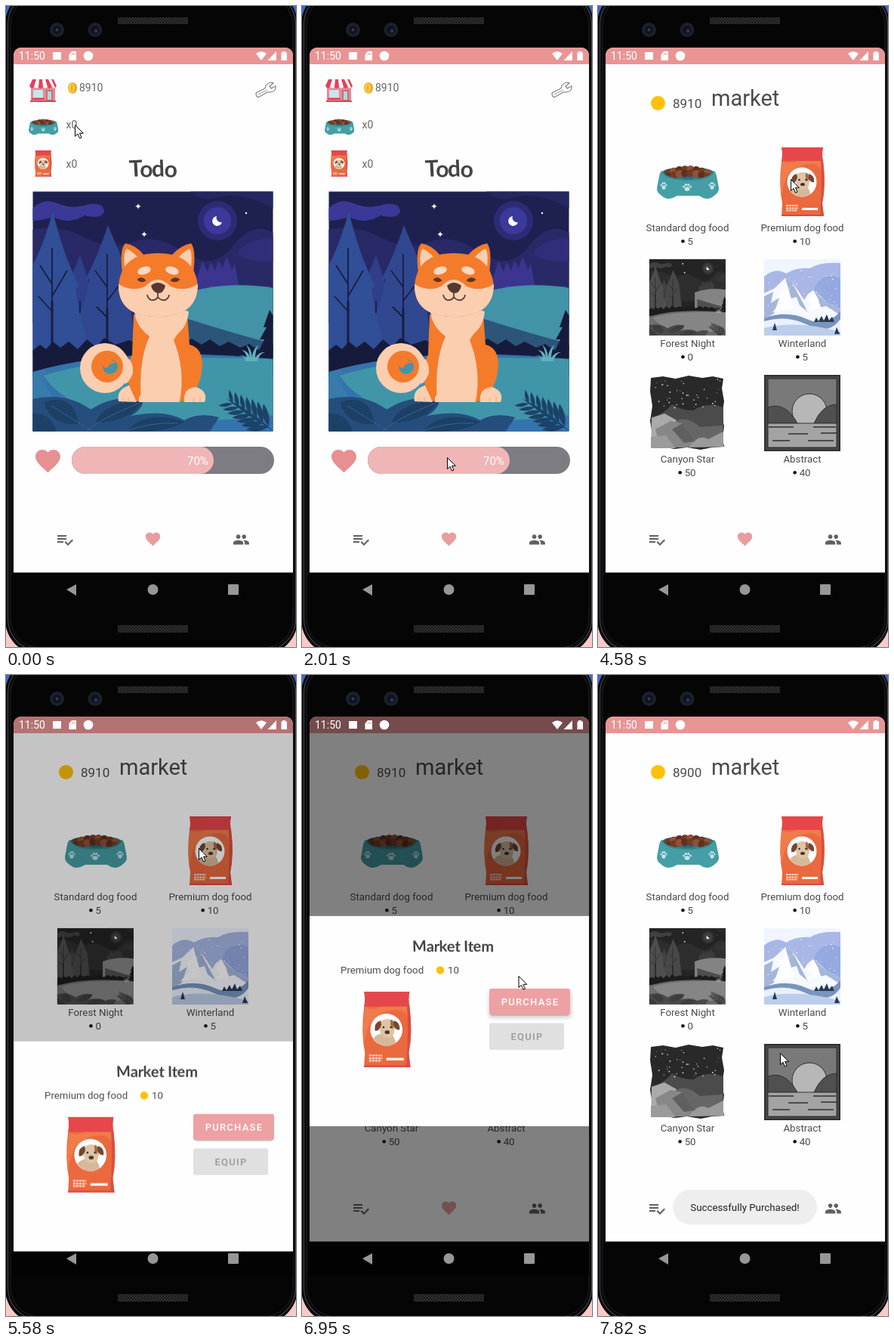
Write an HTML page that moves like this. It is 384 px wide and 848 px high and loops after 8000 ms.

```html
<!DOCTYPE html>
<html lang="en">
<head>
<meta charset="utf-8">
<title>Pet market</title>
<style>
html, body { margin: 0; width: 100%; height: 100%; overflow: hidden; background: #000; }
svg { display: block; }
#stage { width: 384px; height: 848px; font-family: Roboto, sans-serif; }
.title { font-family: Lato, sans-serif; font-weight: 700; fill: #444; text-anchor: middle; }
.mid { text-anchor: middle; }
.btn { font-size: 13px; font-weight: 500; letter-spacing: 1.25px; text-anchor: middle; }
.grey { filter: grayscale(1); }
</style>
</head>
<body>
<svg id="stage" viewBox="0 0 384 848">
<defs>
  <clipPath id="screen"><path d="M10 795V67Q10 55 22 55H368Q380 55 380 67V795Z"/></clipPath>
  <clipPath id="sceneBox"><path d="M35.5 245.5H353.5V562.7H35.5Z"/></clipPath>
  <clipPath id="pic"><path d="M0 0H101V101H0Z"/></clipPath>
  <pattern id="mesh" width="4" height="4" patternUnits="userSpaceOnUse">
    <path d="M0 0H4V4H0Z" fill="#1b1b1b"/><path d="M0 4L4 0M0 0L4 4" stroke="#333" stroke-width=".8"/>
  </pattern>
  <path id="heart" d="M12 21.35l-1.45-1.32C5.4 15.36 2 12.28 2 8.5 2 5.42 4.42 3 7.5 3c1.74 0 3.41.81 4.5 2.09C13.09 3.81 14.76 3 16.5 3 19.58 3 22 5.42 22 8.5c0 3.78-3.4 6.86-8.55 11.54z"/>
  <path id="star" d="M0-4Q.5-.5 4 0 .5.5 0 4-.5.5-4 0-.5-.5 0-4Z" fill="#fff"/>
  <g id="paw" fill="#c4e6e7"><ellipse cy="2" rx="3.4" ry="2.8"/><circle cx="-4.5" cy="-1" r="1.5"/><circle cx="-1.7" cy="-3.4" r="1.6"/><circle cx="1.7" cy="-3.4" r="1.6"/><circle cx="4.5" cy="-1" r="1.5"/></g>

  <g id="bowl">
    <ellipse cx="41" cy="10" rx="35" ry="8" fill="#27717d"/>
    <g id="kibble"></g>
    <path d="M7 7Q12 18 41 18T75 7Q78 8 79 14L82 30Q82 36 77 39 72 44 66 44 60 43 56 40H27Q22 43 16 44 10 44 5 39 0 36 0 30L3 14Q4 8 7 7Z" fill="#459ea6"/>
    <path d="M7 8Q12 19 41 19T75 8" fill="none" stroke="#2f828c" stroke-width="1.6"/>
    <use href="#paw" x="40" y="29"/><use href="#paw" transform="translate(9 27)scale(.75 1)"/><use href="#paw" transform="translate(73 27)scale(.75 1)"/>
  </g>

  <g id="bag">
    <path d="M2 0H57Q55 10 57 18 61 50 56 74L58 91H2L3 74Q-2 50 2 18 4 10 2 0Z" fill="#ea693f"/>
    <path d="M2 0H57Q55 9 57 18H2Q4 9 2 0Z" fill="#e6474a"/>
    <path d="M3 18Q10 23 24 18H57L58 40Q53 14 24 26 5 34 2 66-1 42 3 18Z" fill="#f07b4b"/>
    <path d="M57 18Q61 50 56 74L58 91H53Q56 50 54 18Z" fill="#db4d40"/>
    <path d="M2 89H58V91H2Z" fill="#d94842"/>
    <circle cx="29" cy="46" r="19.5" fill="#fff"/>
    <path d="M13 57Q18 50 24 51H35Q40 57 40 62 29 70 17 61Z" fill="#d5b99a"/>
    <path d="M20 40Q22 33 30 33T40 40L38 51Q36 56 30 56T22 51Z" fill="#dfc4a4"/>
    <path d="M22 35Q14 37 15 47 20 49 23 40ZM38 35Q46 37 45 46 40 47 37 40Z" fill="#744733"/>
    <path d="M36 34Q39 38 37 45 33 43 34 34Z" fill="#a36a49"/>
    <circle cx="25.5" cy="43" r="1.3" fill="#332"/><circle cx="34.5" cy="43" r="1.3" fill="#332"/><ellipse cx="30" cy="49" rx="3" ry="2.1" fill="#49332b"/>
    <path d="M8 77H24M8 80.5H24M8 83.5H23" stroke="#fbd5c5" stroke-width="2" stroke-dasharray="3 .7"/>
    <path d="M29 81.5H50" stroke="#fff" stroke-width="3"/>
  </g>

  <g id="scene" clip-path="url(#sceneBox)">
    <path d="M35 245H354V563H35Z" fill="#1e2150"/>
    <path d="M35 296Q70 288 104 306T168 312 236 326 300 318 354 300V420H35Z" fill="#292968"/>
    <path d="M35 268Q50 253 68 261 88 270 110 262 130 260 130 272 126 283 104 277 84 290 62 279 48 284 35 284Z" fill="#3b3997"/>
    <path d="M250 250Q262 259 286 252T354 268V245H244Z" fill="#252761"/>
    <path d="M306 328Q316 309 354 306V338Q322 340 306 328Z" fill="#302e78"/>
    <circle cx="280" cy="284" r="26" fill="#2c2c76"/><circle cx="280" cy="284" r="18" fill="#3b3999"/>
    <path d="M279 278A6.5 6.5 0 1 0 286 286 6 6 0 0 1 279 278Z" fill="#fff"/>
    <use href="#star" x="175" y="265"/><use href="#star" x="183" y="302"/><circle cx="318" cy="274" r="1.2" fill="#fff"/>
    <path d="M240 375L248 348 253 360 260 337 267 352 271 338 277 350 281 337 287 347 292 331 299 349 303 341 309 375Z" fill="#3b3590"/>
    <path d="M225 384Q285 362 354 373V470H225Z" fill="#4292a8"/>
    <path d="M235 412Q290 430 354 447V465H235Z" fill="#2c5579"/>
    <path d="M98 330Q84 366 66 402V455H140Z" fill="#303f8a"/>
    <path d="M135 290Q122 330 105 362L111 361Q106 390 96 410V460H172L160 350Z" fill="#304890"/>
    <path d="M62 272Q50 315 35 344V460H113Q96 410 92 372L97 371Q76 330 62 272Z" fill="#304f97"/>
    <g fill="none" stroke="#191d44" stroke-width="1.8">
      <path d="M61 320V460M61 368L45 343M61 384L81 350M61 404L43 384M134 328V460M134 372L118 350M134 390L151 368M134 412L120 398M98 390V406"/>
      <path d="M61 390V460M134 400V460" stroke-width="3"/>
    </g>
    <path d="M35 456L45 448 53 454 62 444 72 452 83 444 95 454 107 441 119 451 130 439 145 448 163 442 180 450 210 441 230 450 246 440 259 448 270 441 283 450 295 444 310 452 322 447 333 455 354 452V490H35Z" fill="#171b3b"/>
    <path d="M35 484Q160 448 354 467V563H35Z" fill="#3573ad"/>
    <path d="M50 489Q140 459 354 467V541Q240 556 154 543 75 529 50 489Z" fill="#4195a8"/>
    <path d="M35 485Q60 478 50 489 55 525 90 530L35 544Z" fill="#367bab"/>
    <path d="M349 402L341 425H345L336 441H342L335 456H354V410Z" fill="#171b3b"/>
    <path d="M312 455Q321 456 323 465 322 455 318 448 325 453 326 465 326 454 335 448 330 455 330 466 335 457 343 458 335 460 333 470H317Q317 462 308 463 315 461 319 466 318 458 312 455Z" fill="#5eb3bd"/>
    <path d="M35 520Q80 510 112 534 145 512 182 522 178 543 146 547 205 530 236 548 255 537 282 544L270 563H35Z" fill="#254e7c"/>
    <path d="M50 524Q89 511 96 552 62 558 50 524ZM118 552Q130 523 181 521 170 548 118 552ZM160 563Q185 533 236 550 210 566 160 563ZM35 539Q60 538 67 563H35Z" fill="#1d4066"/>
    <path d="M60 529L115 563M177 525Q123 547 106 563M228 552Q190 550 158 563" fill="none" stroke="#376292"/>
    <g id="fern" fill="#1c4268"></g>
  </g>

  <g id="dog">
    <circle cx="131" cy="479" r="33" fill="#fbceb0"/><circle cx="134" cy="477" r="21" fill="#f47b2a"/>
    <circle cx="138" cy="477" r="10" fill="#4195a8"/><path d="M128 475Q130 467 138 467L147 472Q137 471 135 478 130 480 128 475Z" fill="#f47b2a"/>
    <path d="M169 408Q201 426 240 408L243 448Q260 452 260 475 258 501 248 510L262 523H160Q157 510 163 500 155 485 167 461Z" fill="#f47b2a"/>
    <path d="M170 404Q198 393 242 404 240 424 227 434L222 442Q238 482 230 523H179Q175 470 190 437 172 424 170 404Z" fill="#fbceb0"/>
    <path d="M160 465Q169 470 168 486 163 498 158 500 150 488 160 465Z" fill="#fbceb0"/>
    <path d="M149 523Q146 507 163 502L173 524ZM176 524Q174 511 191 511 204 511 204 524ZM202 524Q205 511 219 511 231 512 230 524ZM236 524Q234 505 252 504 268 510 263 524Z" fill="#fbceb0"/>
    <path d="M155 518V524M162 517V524M249 518V524M257 517V524" fill="none" stroke="#eeae8a" stroke-width="1.2"/>
    <path d="M154 353Q150 322 158 314 172 316 183 330ZM248 353Q252 322 245 314 232 316 219 330Z" fill="#f47b2a"/>
    <path d="M157 345Q155 326 160 321 168 325 175 333ZM245 345Q247 326 243 321 235 325 228 333Z" fill="#fbceb0"/>
    <path d="M149 371Q152 327 201 327T254 371Q252 411 201 411T149 371Z" fill="#f47b2a"/>
    <path d="M149 368Q168 379 184 371 193 362 201 362T218 371Q236 379 254 368 254 411 201 411T149 368Z" fill="#fbceb0"/>
    <ellipse cx="183" cy="350" rx="9" ry="5" fill="#fbd9c4" transform="rotate(-16 183 350)"/><ellipse cx="220" cy="350" rx="9" ry="5" fill="#fbd9c4" transform="rotate(16 220 350)"/>
    <path d="M174 362Q179 357 185 363 180 367 174 362ZM218 363Q224 357 230 362 224 367 218 363Z" fill="#59372c" stroke="#59372c"/>
    <path d="M192 370Q201 362 211 370 209 380 201 380 194 378 192 370Z" fill="#56392f"/>
    <path d="M201 379V385Q198 390 192 389 188 387 187 382M201 385Q205 390 211 389 216 386 216 382" fill="none" stroke="#56392f" stroke-width="1.7"/>
  </g>

  <g id="winter" clip-path="url(#pic)">
    <path d="M0 0H101V101H0Z" fill="#a8b7e6"/>
    <circle cx="89" cy="45" r="23" fill="#94a9df"/>
    <path d="M0 0H101V5Q74 3 61 12 43 10 29 19 15 10 0 23Z" fill="#f0f5ff"/>
    <path d="M0 45L13 39 28 25 37 30 46 43 53 54 58 46 65 41 75 49 83 57 101 66V101H0Z" fill="#f6f9ff"/>
    <path d="M28 25L37 30 44 44 58 70 47 61 43 50 36 52ZM65 41L83 57 101 66V74L82 62 74 64 72 53ZM0 49L12 43 9 58 20 51 13 72 0 80Z" fill="#a4b6da"/>
    <path d="M28 25L27 41 20 43 23 57 11 70 40 64 33 47ZM65 41L58 55 64 61 54 68 76 65Z" fill="#fff"/>
    <path d="M0 78Q30 67 56 79T101 69V101H0Z" fill="#7994bd"/>
    <path d="M0 82Q30 73 58 87T101 79V101H0Z" fill="#e9f0fc"/>
    <path d="M0 91Q42 80 101 96V101H0Z" fill="#bbcdea"/>
    <path d="M66 83L69 77 72 82 76 75 79 81 83 73 86 81 90 76 93 83ZM11 94L14 84 17 94ZM93 99L96 90 100 99Z" fill="#263a56"/>
    <g id="snow" fill="#e9f0ff"></g>
  </g>

  <g id="canyon">
    <path d="M2 4L18 2 35 5 52 1 70 4 84 2 98 5 96 18 99 35 96 54 99 68 97 84 99 95 83 96 68 99 50 96 33 98 18 95 2 97 4 79 1 61 4 41 1 22Z" fill="#292929"/>
    <path d="M3 55Q16 55 30 39 42 47 58 47 78 35 98 43V85L4 86Z" fill="#4b4b4b"/>
    <path d="M28 67Q45 49 67 69L97 67V95L50 96Z" fill="#666"/>
    <path d="M3 57L20 51 36 60 30 72 51 95 2 97Z" fill="#aaa"/>
    <path d="M8 72L28 61 44 64 61 88 50 96 15 96Z" fill="#878787"/>
    <path d="M2 82L22 80 35 97 2 97ZM52 96Q65 77 78 85L98 75V95Z" fill="#9b9b9b"/>
    <path d="M30 72L44 64 61 88 46 90Z" fill="#606060"/>
    <g id="night" fill="#eee"></g>
  </g>

  <g id="abstract" stroke="#303030">
    <path d="M1 1H100V100H1Z" fill="#484848" stroke-width="2"/><path d="M5 5H96V96H5Z" fill="#797979"/>
    <circle cx="60" cy="48" r="23" fill="#b7b7b7"/>
    <path d="M5 43Q28 35 44 64H5ZM96 39Q77 39 66 64H96Z" fill="#505050"/>
    <path d="M5 64H96V96H5Z" fill="#a3a3a3"/>
    <path d="M6 69H39M65 69H95M32 78H58M11 87H34M58 87H92M75 77H96" stroke-width="1.5"/>
  </g>
</defs>

<path d="M0 0H384V700H0Z" fill="#3c69cf"/><path d="M0 728H384V848H0Z" fill="#fac9c8"/>
<rect x="-1" y="-22" width="387" height="880" rx="46" fill="#08080a"/>
<rect x="2.5" y="-18" width="381" height="871" rx="42" fill="none" stroke="#454548" stroke-width="1.2"/>
<rect x="6" y="-14" width="374" height="863" rx="39" fill="#050506" stroke="#222225"/>
<path d="M148 15H241V24H148ZM148 819H241V829H148Z" fill="url(#mesh)"/>
<g fill="#1c202a"><circle cx="67.5" cy="31.5" r="9.5"/><circle cx="118" cy="31.5" r="9.5"/></g>
<g fill="#10131e"><circle cx="67.5" cy="31.5" r="5.5"/><circle cx="118" cy="31.5" r="5.5"/></g>
<g fill="#2d3a5a"><circle cx="67.5" cy="31.5" r="2"/><circle cx="119" cy="33" r="2.2"/></g>

<g clip-path="url(#screen)">
  <path d="M10 55H380V750H10Z" fill="#fefefe"/>
  <path d="M10 55H380V77H10Z" fill="#e89594"/>
  <path d="M10 749.5H380V795H10Z" fill="#050505"/>

  <g id="home" fill="#666" font-size="14">
    <g transform="translate(31 97)">
      <path d="M2 10H34V30H2Z" fill="#ee8597"/><path d="M5 14H18V24H5Z" fill="#c2e7ed"/><path d="M22 14H31V29H22Z" fill="#c67268"/><path d="M24 16H29V27H24Z" fill="#a6dbe4"/>
      <path d="M3 25H20V27H3ZM1 28H35V30H1Z" fill="#d94258"/>
      <path d="M4 0H32L36 9Q33 14 30 10 27 14 24 10 21 14 18 10 15 14 12 10 9 14 6 10 3 14 0 9Z" fill="#e6405c"/>
      <path d="M9 0H13L12 10Q9 14 6 10ZM17 0H21L24 10Q21 14 18 10ZM25 0H29L34 11Q32 13 30 10Z" fill="#fff"/>
    </g>
    <ellipse cx="88" cy="108.5" rx="6" ry="7.3" fill="#e4a31f"/><ellipse cx="87" cy="108.5" rx="4.5" ry="6.2" fill="#f6c944"/><path d="M87 105V112" stroke="#e0a52a" stroke-width="1.5"/>
    <text x="97" y="113">8910</text><text x="79.5" y="161.5">x0</text><text x="79.5" y="213.5">x0</text>
    <use href="#bowl" transform="translate(30 149.5)scale(.48)"/><use href="#bag" transform="translate(38 191)scale(.38)"/>
    <path d="M331 115L343 109Q344 102 351 101L354 102 349 106 351 109 357 106Q358 113 350 114L346 114 334 121Q331 120 331 115Z" fill="#fff" stroke="#777" stroke-width="1.1"/><path d="M334 117L346 111" stroke="#999"/>
    <text class="title" x="194.5" y="226" font-size="30" letter-spacing="-1" rotate="-3 2 -2 3">Todo</text>
    <use href="#scene"/><use href="#dog"/>
    <use href="#heart" transform="translate(35.7 582)scale(1.65)" fill="#e69091"/>
    <rect x="87" y="583" width="268" height="36" rx="18" fill="#7d7c82"/><rect x="87" y="583" width="188" height="36" rx="18" fill="#f0b5b6"/>
    <text x="240" y="607" font-size="15" fill="#fff">70%</text>
  </g>

  <g id="market" fill="#4b4b4b">
    <circle cx="79.5" cy="128.5" r="9.5" fill="#ffc107"/>
    <text id="before" x="99" y="135" font-size="17">8910</text><text id="after" x="99" y="135" font-size="17">8900</text>
    <text x="150" y="132" font-size="29">market</text>
    <use href="#bowl" x="78" y="211"/><use href="#bag" x="241" y="187"/>
    <g class="grey"><use href="#scene" transform="translate(68 335)scale(.318)translate(-36 -246)"/></g>
    <use href="#winter" x="220" y="335"/><use href="#canyon" x="68" y="488"/><use href="#abstract" x="220" y="488"/>
    <g id="labels" font-size="13.3"></g>
  </g>

  <g fill="#616161">
    <path transform="translate(66 694)" d="M14 10H2v2h12v-2zm0-4H2v2h12V6zM2 16h8v-2H2v2zm19.5-4.5L23 13l-6.99 7-4.51-4.5L13 14l3.01 3z"/>
    <use href="#heart" transform="translate(182.9 693.5)scale(.97)" fill="#e89e9f"/>
    <path transform="translate(300 694.5)scale(.95)" d="M16 11c1.66 0 3-1.34 3-3s-1.34-3-3-3-3 1.34-3 3 1.34 3 3 3zm-8 0c1.66 0 3-1.34 3-3S9.66 5 8 5 5 6.34 5 8s1.34 3 3 3zm0 2c-2.33 0-7 1.17-7 3.5V19h14v-2.5c0-2.33-4.67-3.5-7-3.5zm8 0l-1 .05c1.2.84 2 1.97 2 3.45V19h6v-2.5c0-2.33-4.67-3.5-7-3.5z"/>
  </g>

  <path id="dim" d="M10 55H380V795H10Z"/>
  <g id="sheet" fill="#4b4b4b">
    <path d="M10 0H380V278H10Z" fill="#fefefe"/>
    <text class="title" x="200" y="47" font-size="20" letter-spacing="-.2" rotate="-2 1 2 -1 1 2 0 -1 2 -2 1">Market Item</text>
    <text x="51" y="75.5" font-size="13.3">Premium dog food</text><circle cx="183" cy="71.5" r="5.2" fill="#ffc107"/><text x="193" y="75.5" font-size="13.3">10</text>
    <use href="#bag" transform="translate(80 100)scale(1.095)"/>
    <rect x="249" y="98" width="105" height="34" rx="4" fill="#ccc"/>
    <rect id="lift" x="247" y="99" width="110" height="36" rx="5" fill="#999" style="filter:blur(2px)"/>
    <rect x="248" y="96" width="107" height="34.5" rx="3" fill="#eda1a2"/><text class="btn" x="302" y="118" fill="#fff">PURCHASE</text>
    <rect x="248" y="141.5" width="99" height="35.5" rx="3" fill="#e0e0e0"/><text class="btn" x="298" y="164" fill="#999">EQUIP</text>
  </g>
  <g id="toast"><rect x="99" y="681" width="191" height="46" rx="23" fill="#eee"/><text class="mid" x="194.5" y="709" font-size="13.3" fill="#222">Successfully Purchased!</text></g>
</g>

<g fill="#fff">
  <text x="17" y="71" font-size="14">11:50</text>
  <path d="M62 61H73V71H62ZM87 60H93V72H83.5V64Z"/><path d="M86 63V65M88.5 62V65M91 62V65" stroke="#e89594"/>
  <circle cx="109" cy="66" r="6.3"/>
  <path d="M331 63Q338 57.5 345 63L338 72ZM358 60V72H346.5ZM366 60H370V61.5H372V72H364.5V61.5H366Z"/>
</g>
<g fill="#979797"><path d="M80 772L93 765V780Z"/><circle cx="194.5" cy="772" r="7"/><rect x="294" y="765" width="14" height="14" rx="1"/></g>
<path id="cursor" d="M.5 .5V15.5L4 12.2 6.5 18 9 17 6.5 11.3H11.3Z" fill="#fff" stroke="#000"/>
</svg>

<script>
const $ = id => document.getElementById(id);
const LOOP = 8000;
const IN = 'cubic-bezier(.333,0,.667,.333)', OUT = 'cubic-bezier(.333,.667,.667,1)';

// Small repeated shapes
let seed = 7;
const rnd = n => (seed = seed * 16807 % 2147483647) / 2147483647 * n;
const dots = (id, n, w, h, r, x = 0, y = 0) => {
  for (let i = 0; i < n; i++)
    $(id).innerHTML += `<circle cx="${x + rnd(w)}" cy="${y + rnd(h)}" r="${r * (.5 + rnd(.6))}"/>`;
};
dots('snow', 55, 101, 60, .8, 0, 15);
dots('night', 42, 88, 39, .8, 6, 5);
for (let i = 0; i < 16; i++) {
  const x = 15 + i % 8 * 7.4, y = 10 + (i >> 3) * 5 - Math.sin((x - 15) / 16.5) * 5;
  $('kibble').innerHTML += `<circle cx="${x}" cy="${y}" r="5" fill="${['#713c26', '#925137', '#5d3122'][i % 3]}"/>`;
}
const leaf = (x, y, angle, size) =>
  `<path transform="translate(${x} ${y})rotate(${angle})scale(${size})" d="M0 0Q13-8 28 0 13 6 0 0Z"/>`;
for (let i = 0; i < 7; i++) {
  const x = 348 - i * 8, y = 556 - i * 5, s = 1.1 - i * .07;
  $('fern').innerHTML += leaf(x, y, 172, s) + leaf(x, y, 257, s);
}
$('fern').innerHTML += '<path d="M354 562Q325 535 291 519L320 541Z"/>';

// Market labels, two per row
[['Standard dog food', 5], ['Premium dog food', 10], ['Forest Night', 0],
 ['Winterland', 5], ['Canyon Star', 50], ['Abstract', 40]].forEach(([name, price], i) => {
  const cx = 118.5 + i % 2 * 152, y = 297.5 + (i >> 1) * 153;
  const left = cx - (8.7 + 7.5 * String(price).length) / 2;
  $('labels').innerHTML += `<text class="mid" x="${cx}" y="${y}">${name}</text>
    <circle cx="${left + 2}" cy="${y + 13.7}" r="2.3" fill="#111"/><text x="${left + 8}" y="${y + 18}">${price}</text>`;
});

// Steps are [time, value, easing to the next step]
function play(id, prop, steps) {
  const frames = steps.map(([t, v, easing = 'linear']) => ({ offset: t / LOOP, [prop]: v, easing }));
  frames.push({ ...frames.at(-1), offset: 1 });
  $(id).animate(frames, { duration: LOOP, iterations: Infinity });
}
const swap = (id, t, from) => play(id, 'opacity', [[0, from, 'step-end'], [t, 1 - from]]);
const at = (x, y) => `translate(${x}px, ${y}px)`;

swap('home', 3190, 1);
swap('market', 3190, 0);
swap('before', 7100, 1);
swap('after', 7100, 0);
play('dim', 'opacity', [[0, 0], [5490, 0], [5730, .6], [6910, .6], [7150, 0]]);
play('sheet', 'transform', [
  [0, at(0, 795)], [5491, at(0, 795), OUT], [5731, at(0, 286)],
  [6890, at(0, 286), IN], [7130, at(0, 795)]]);
play('lift', 'opacity', [[0, 0], [6630, 0], [6750, .4]]);
play('toast', 'opacity', [[0, 0], [7180, 0], [7560, 1]]);
play('cursor', 'transform', [
  [0, 91, 157], [30, 91, 157], [200, 88, 170], [500, 99, 206], [810, 97, 224],
  [840, 96, 222], [960, 90, 204, 'ease-in-out'], [1240, 61, 592, 'ease-in-out'],
  [1470, 223, 617], [1620, 206, 607], [1700, 200, 602], [2000, 192, 597],
  [2070, 192, 597, 'ease-in-out'], [2450, 37, 93], [2620, 46, 111],
  [3840, 46, 111, 'ease-in-out'], [4580, 255, 229], [5870, 255, 229], [5900, 255, 236, 'ease-in-out'],
  [6480, 286.5, 398], [7060, 286.5, 398, 'ease-in-out'], [7430, 271, 391, 'ease-in-out'], [7820, 241, 500]
].map(([t, x, y, ease]) => [t, at(x, y), ease]));
</script>
</body>
</html>
```
